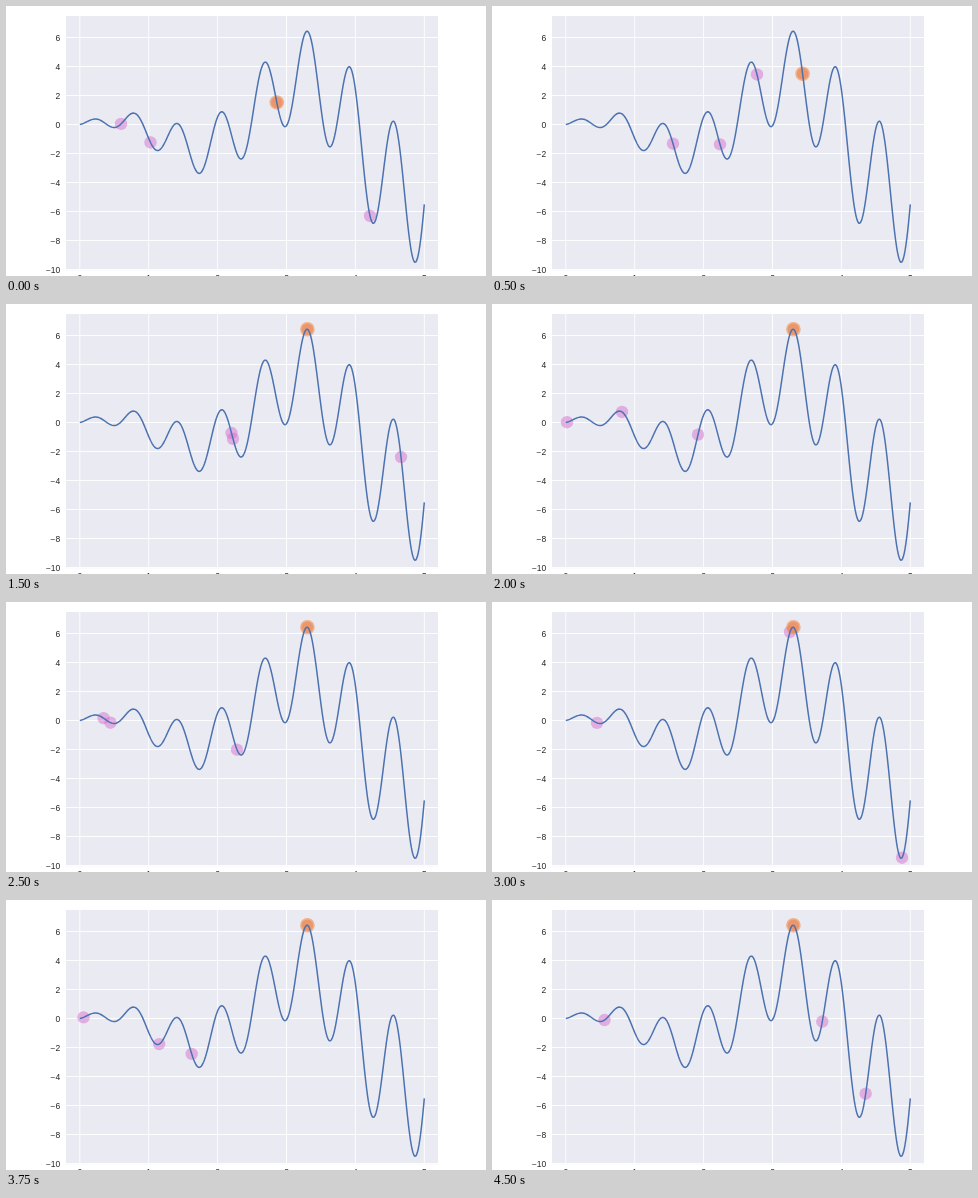
Write an HTML page with a canvas that moves like this. It is 480 by 270 pixels and loops after 4750 ms.

```html
<!DOCTYPE html>
<html lang="en">
<head>
<meta charset="utf-8">
<title>Evolutionary search</title>
<style>
  html, body { margin: 0; height: 100%; overflow: hidden; background: #fff; }
  canvas { display: block; }
</style>
</head>
<body>
<canvas id="stage" width="480" height="270"></canvas>
<script>
const ctx = document.getElementById('stage').getContext('2d');
const STEP = 250, PEAK = 301.4;

const toX = v => 73.8 + 68.9 * v;
const toY = v => 118.5 - 14.5 * v;
const curve = v => v * (Math.sin(10 * v) + Math.cos(2 * v));
const curveY = x => toY(curve((x - 73.8) / 68.9));

// Horizontal positions of the candidates in each generation.
const generations = [
  [115, 144.5, 364], [164, 286, 319.5], [181, 228, 265], [392, 206, 287],
  [158.5, 164, 182], [80, 305, 414.5], [225.5, 227, 395], [339.5, 227, 179],
  [75, 206, 130], [397, 373, 296], [97.5, 104.5, 231], [331, 301, 150],
  [105, 298, 410], [163, 281.5, 320.5], [325, 206, 164], [77.5, 153.2, 185.7],
  [326, 236, 301], [107, 355, 281], [112.5, 330.3, 373.7]
];
const earlyBest = [270.8, 270.8, 310.6, 310.6, 306.8];

function line(x1, y1, x2, y2) {
  ctx.beginPath();
  ctx.moveTo(x1, y1);
  ctx.lineTo(x2, y2);
  ctx.stroke();
}

function dot(x, radius, color) {
  ctx.fillStyle = color;
  ctx.beginPath();
  ctx.arc(x, curveY(x), radius, 0, 2 * Math.PI);
  ctx.fill();
}

function drawAxes() {
  ctx.fillStyle = '#fff';
  ctx.fillRect(0, 0, 480, 270);
  ctx.fillStyle = '#eaeaf2';
  ctx.fillRect(60, 10, 372, 254.2);

  ctx.font = '8.5px "Liberation Sans", Arial, sans-serif';
  ctx.fillStyle = '#262626';
  ctx.strokeStyle = '#fff';
  ctx.lineWidth = 0.9;
  ctx.textAlign = 'center';
  for (let v = 0; v <= 5; v++) {
    line(toX(v), 10, toX(v), 264.2);
    ctx.fillText(v, toX(v), 275);
  }
  ctx.textAlign = 'right';
  for (let v = -10; v <= 6; v += 2) {
    line(60, toY(v), 432, toY(v));
    ctx.fillText(String(v).replace('-', '\u2212'), 54.3, toY(v) + 3.2);
  }
}

function drawCurve() {
  ctx.strokeStyle = '#4c72b0';
  ctx.lineWidth = 1.5;
  ctx.lineJoin = 'round';
  ctx.beginPath();
  for (let i = 0; i <= 400; i++) ctx.lineTo(toX(i / 80), toY(curve(i / 80)));
  ctx.stroke();
}

function draw(now) {
  const step = Math.floor(now / STEP) % generations.length;
  const best = earlyBest[step] ?? PEAK;
  drawAxes();
  for (const x of generations[step]) dot(x, 6.2, 'rgba(214, 112, 208, 0.5)');
  dot(best, 7.3, 'rgba(240, 140, 70, 0.58)');
  dot(best, 5.8, 'rgba(235, 125, 75, 0.55)');
  drawCurve();
}

const start = performance.now();
function tick() {
  draw(performance.now() - start);
  requestAnimationFrame(tick);
}
tick();
</script>
</body>
</html>
```
